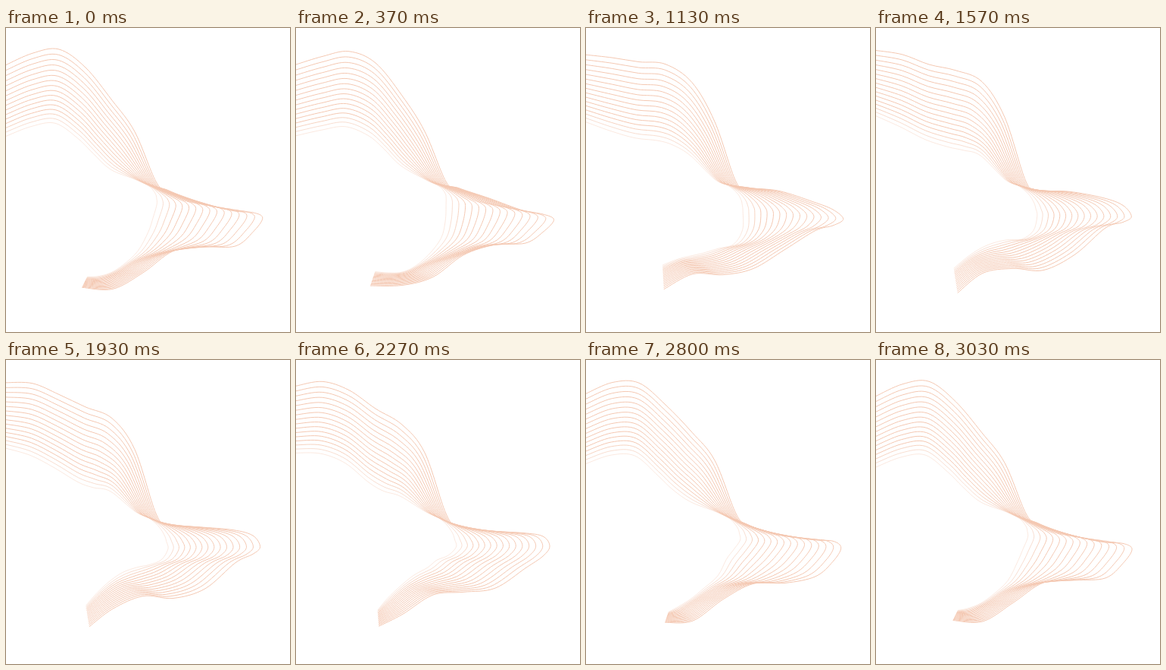
An HTML page with a canvas for the animation above (3160 ms loop, 375 by 400 pixels).

```html
<!DOCTYPE html>
<html lang="en">
<head>
<meta charset="utf-8">
<title>Flowing lines</title>
<style>
  html, body { margin: 0; width: 100%; height: 100%; overflow: hidden; background: #fff; }
  canvas { display: block; }
</style>
</head>
<body>
<canvas id="stage" width="375" height="400"></canvas>
<script>
const ctx = document.getElementById('stage').getContext('2d');
const LOOP = 3160, LAST_STEP = 91, LINES = 16;

// A wave runs to the right through every key point.
// x, y: resting place; rise, sway: vertical and horizontal swing; lag: extra phase in degrees.
const key = (x, y, rise = 0, sway = 0, lag = 0) => ({ x, y, rise, sway, lag });

// Pairs of matching key points on the outermost and the innermost line.
const pairs = [
  [key(0, 39, 10), key(0, 129, 14)],
  [key(35, 34, 6), key(33, 130, 7)],
  [key(70, 38, 10), key(65, 136, 11)],
  [key(105, 54, 10), key(95, 151, 10)],
  [key(140, 83, 13), key(115, 163, 10)],
  [key(170, 127, 10, 0, -30), key(138, 177, 10)],
  // the twist
  [key(198, 202), key(170, 199)],
  [key(215, 214, 5, 0, 118), key(187, 207)],
  [key(255, 222, 8, 0, 83), key(197, 215, 3, 4, 80)],
  [key(300, 232, 9, 0, 31), key(203, 224, 6, 6, 80)],
  [key(326, 238, 7), key(205, 231, 8, 7, 80)],
  // the tip
  [key(338, 249, 4, 3), key(206, 240, 9, 8, 80)],
  [key(326, 262, 7, 0, -25), key(201, 258, 9, 7, 45)],
  [key(303, 275, 12), key(190, 273, 12, 5, 20)],
  [key(263, 293, 8, 0, -30), key(174, 286, 14)],
  [key(221, 306, 13), key(155, 297, 18, 0, 23)],
  [key(181, 319, 10), key(138, 306, 17, 0, 44)],
  [key(141, 333, 11), key(121, 314, 13, 0, 55)],
  [key(104, 345, 6, 6, -25), key(105, 322, 10, 4, 45)]
];

function place({ x, y, rise, sway, lag }, turn) {
  const phase = (17 + 2.3 * x + lag) * Math.PI / 180;
  const swing = Math.cos(turn * 2 * Math.PI - phase);
  return [x + sway * swing, y + rise * swing];
}

function strokeSpline(pts) {
  const at = i => pts[Math.max(0, Math.min(pts.length - 1, i))];
  ctx.beginPath();
  ctx.moveTo(...pts[0]);
  for (let i = 0; i < pts.length - 1; i++) {
    const [a, b, c, d] = [-1, 0, 1, 2].map(k => at(i + k));
    ctx.bezierCurveTo(
      b[0] + (c[0] - a[0]) / 6, b[1] + (c[1] - a[1]) / 6,
      c[0] - (d[0] - b[0]) / 6, c[1] - (d[1] - b[1]) / 6,
      ...c);
  }
  ctx.stroke();
}

function draw(now) {
  // 30 steps a second, resting briefly on the last one
  const step = Math.min(LAST_STEP, Math.floor((now % LOOP + 4) * .03));
  const turn = step / .03 / LOOP;
  const ends = pairs.map(pair => pair.map(p => place(p, turn)));
  ctx.clearRect(0, 0, 375, 400);
  ctx.strokeStyle = '#f4c8b2';
  ctx.lineWidth = 1;
  for (let n = 0; n < LINES; n++) {
    const u = n / (LINES - 1);
    const mix = u * (1.13 - .13 * u); // slightly denser inwards
    ctx.globalAlpha = Math.min(1, .4 + .2 * (LINES - 1 - n));
    strokeSpline(ends.map(([from, to]) => from.map((v, i) => v + (to[i] - v) * mix)));
  }
}

const start = performance.now();
function tick() {
  draw(performance.now() - start);
  requestAnimationFrame(tick);
}
tick();
</script>
</body>
</html>
```
